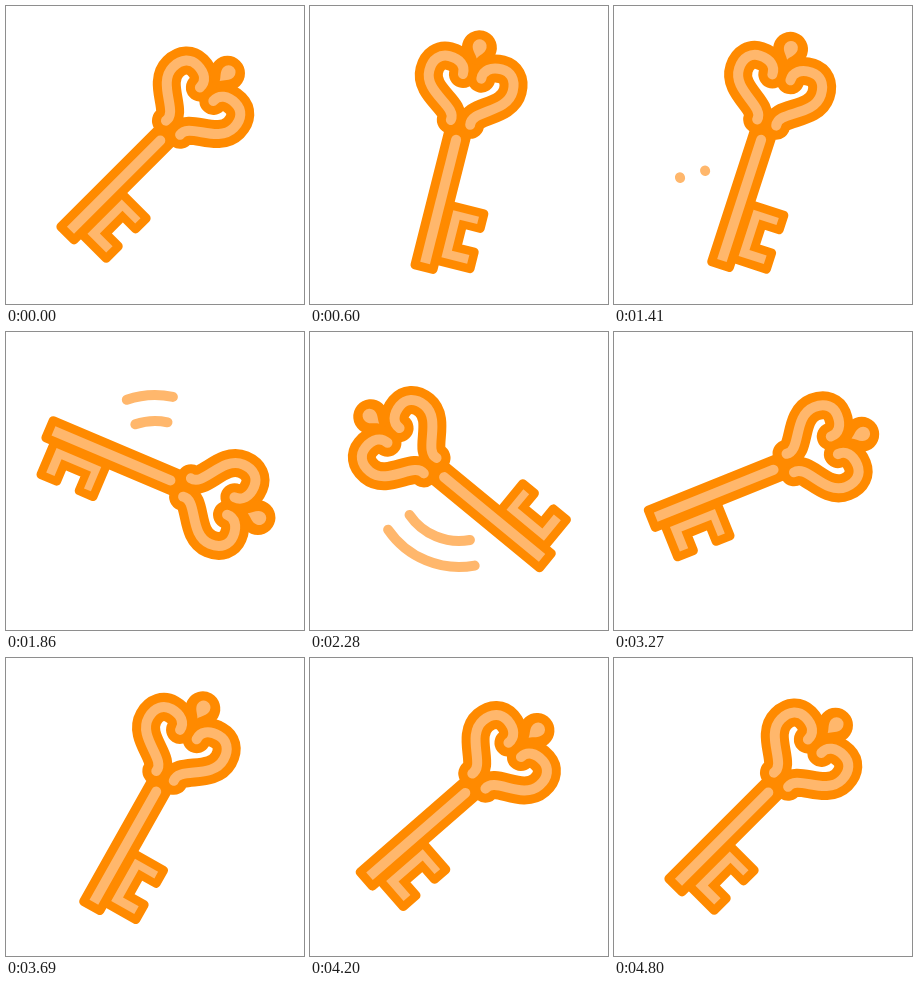
These frames come from a looping animation (298 by 298 pixels, 5.4 s). An HTML page:

```html
<!DOCTYPE html>
<html lang="en">
<head>
<meta charset="utf-8">
<title>Turning key</title>
<style>
  html, body { margin: 0; width: 100%; height: 100%; overflow: hidden; background: #fff; }
  svg { display: block; width: 100vw; height: 100vh; }
  .line { fill: none; stroke-linecap: round; }
  .dark { fill: #ff8a00; stroke: #ff8a00; stroke-width: 28; }
  .dark .solid { stroke-width: 9; stroke-linejoin: round; }
  .light { fill: #ffb76c; stroke: #ffb76c; stroke-width: 10; }
  .light .solid { stroke: none; }
</style>
</head>
<body>
<svg viewBox="0 0 298 298">
  <defs>
    <path id="scroll" class="line" d="M10 -32C7 -47 43 -52 43 -75C43 -87 36 -93.500 27 -93.500C16 -93.500 9 -88 9.500 -79.500"/>
    <g id="bow">
      <use href="#scroll"/>
      <use href="#scroll" transform="scale(-1 1)"/>
    </g>
  </defs>
  <g transform="translate(149 149)">
    <g class="light"><path id="trails" class="line"/></g>
    <g id="key">
      <g transform="translate(-6.5 0)">
        <g class="dark">
          <use href="#bow"/>
          <g class="solid">
            <circle cy="-109" r="13"/>
            <path d="M-9.300 117.300V-20H9.300V117.300z"/>
            <path d="M10 51H45V66H27V90.500H45V107.500H10z"/>
          </g>
        </g>
        <g class="light">
          <use href="#bow"/>
          <g class="solid">
            <path d="M0 -98C-2 -102 -7 -105 -7 -110.500A7 7 0 0 1 7 -110.500C7 -105 2 -102 0 -98z"/>
            <path d="M-5 113V-14a5 5 0 0 1 10 0V113z"/>
            <path d="M14.500 55H41V62.500H23V94.500H41V103.500H14.500z"/>
          </g>
        </g>
      </g>
    </g>
  </g>
</svg>
<script>
const LOOP = 5400, STEP = 30;
const key = document.getElementById('key');
const trails = document.getElementById('trails');

// [time in ms, degrees]: wind-up, full turn, then a damped settle
const turn = [[325, 45], [900, -21], [1410, 18], [2010, 169], [2280, 309.5], [2610, 410],
  [2760, 436], [3000, 447], [3705, 389.3], [4290, 410.3], [4800, 405]];
// How far each end of the trails lags behind the bow, in degrees
const nearLag = [[1400, 123], [2280, 74], [2760, 62], [2970, 60]];
const farLag = [[1400, 123], [2280, 140], [2760, 91], [2970, 62]];

const slope = (keys, i) => (keys[i + 1][1] - keys[i][1]) / (keys[i + 1][0] - keys[i][0]);

// Speed at a key: zero at the ends and turning points
function tangent(keys, i) {
  if (i === 0 || i === keys.length - 1) return 0;
  const a = slope(keys, i - 1), b = slope(keys, i);
  if (a * b <= 0) return 0;
  const before = keys[i][0] - keys[i - 1][0], after = keys[i + 1][0] - keys[i][0];
  return (a * after + b * before) / (before + after);
}

// Smooth cubic through the keys
function sample(keys, t) {
  const last = keys.length - 1;
  if (t <= keys[0][0]) return keys[0][1];
  if (t >= keys[last][0]) return keys[last][1];
  const i = keys.findIndex(k => k[0] > t) - 1;
  const [t0, v0] = keys[i], [t1, v1] = keys[i + 1];
  const h = t1 - t0, u = (t - t0) / h, w = 1 - u;
  return v0 * w * w * (1 + 2 * u) + v1 * u * u * (3 - 2 * u)
    + h * u * w * (w * tangent(keys, i) - u * tangent(keys, i + 1));
}

function point(radius, degrees) {
  const a = degrees * Math.PI / 180;
  return `${radius * Math.sin(a)} ${-radius * Math.cos(a)}`;
}

function draw(t) {
  const angle = sample(turn, t);
  key.setAttribute('transform', `rotate(${angle})`);
  const near = angle - sample(nearLag, t);
  const far = Math.min(angle - sample(farLag, t), near - 0.5);
  const visible = t >= 1400 && t < 2970;
  trails.setAttribute('d', visible
    ? [60, 86].map(r => `M${point(r, far)}A${r} ${r} 0 0 1 ${point(r, near)}`).join('')
    : '');
}

const start = performance.now();
function tick() {
  const t = (performance.now() - start) % LOOP;
  draw(Math.floor(t / STEP) * STEP);
  requestAnimationFrame(tick);
}
tick();
</script>
</body>
</html>
```
